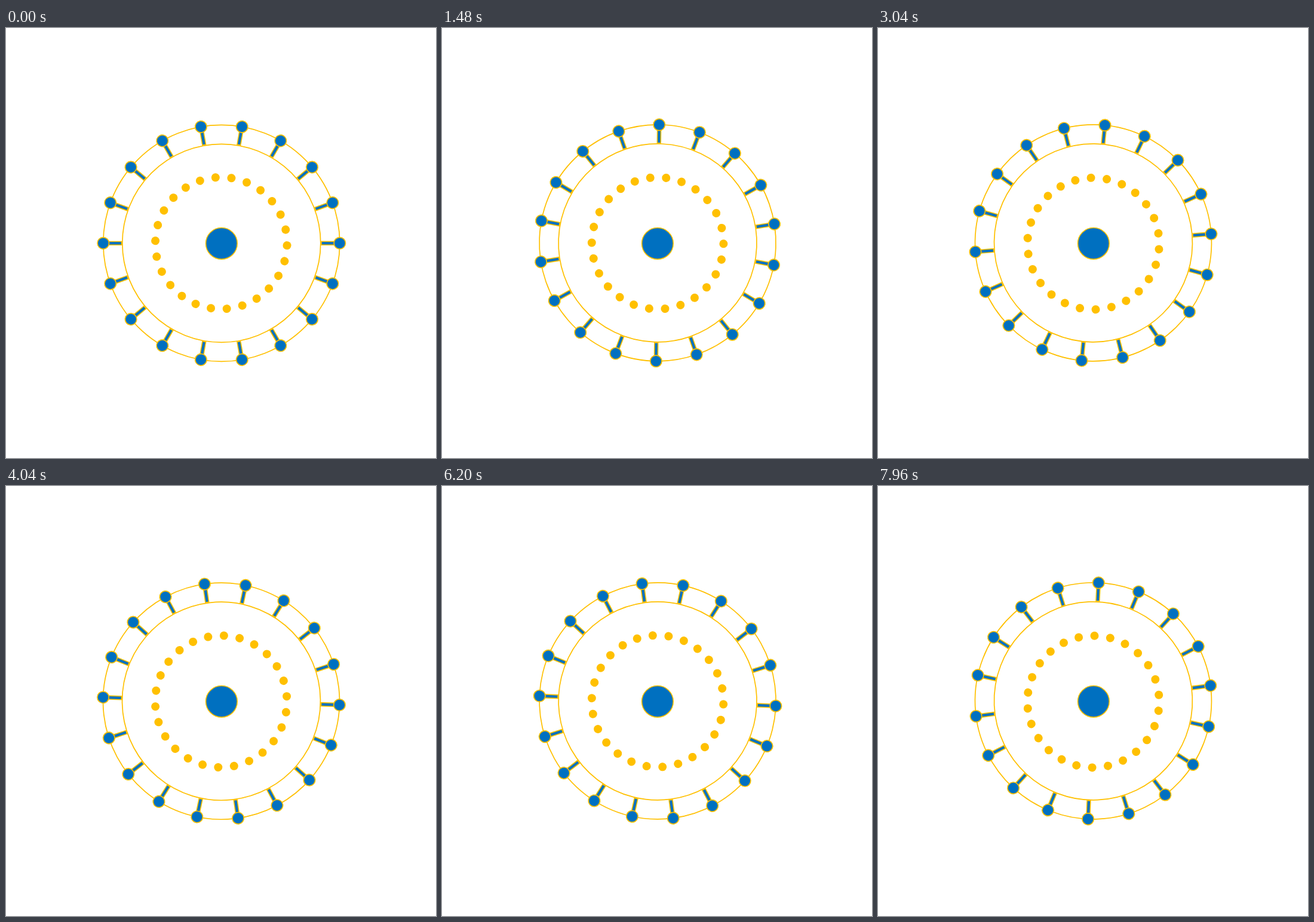
These frames come from a looping animation (720x720 px, 8 s). An HTML page with a canvas:

```html
<!DOCTYPE html>
<html lang="en">
<head>
<meta charset="utf-8">
<title>Counter-rotating rings</title>
<style>
  html, body { margin: 0; width: 100%; height: 100%; overflow: hidden; background: #fff; }
  canvas { display: block; }
</style>
</head>
<body>
<canvas id="stage" width="720" height="720"></canvas>
<script>
const ctx = document.getElementById('stage').getContext('2d');
const YELLOW = '#ffc000', BLUE = '#0070c0';
const LOOP = 8000, STEP = 40, DEG = Math.PI / 180;
const TURN = 2.952 * DEG; // rotation per step
const SPOKES = 18, BEADS = 26;

function circle(x, y, radius, fill, stroke, width) {
  ctx.beginPath();
  ctx.arc(x, y, radius, 0, Math.PI * 2);
  if (fill) { ctx.fillStyle = fill; ctx.fill(); }
  if (stroke) { ctx.strokeStyle = stroke; ctx.lineWidth = width; ctx.stroke(); }
}

function bar(from, to, thickness, fill) {
  ctx.fillStyle = fill;
  ctx.fillRect(from, -thickness / 2, to - from, thickness);
}

// Draws a ring of equal parts turning about a slightly off-centre pivot.
function ring(x, y, wobble, wobbleAngle, angle, count, drawPart, drawBase) {
  ctx.save();
  ctx.translate(x + wobble * Math.cos(angle + wobbleAngle),
                y + wobble * Math.sin(angle + wobbleAngle));
  ctx.rotate(angle);
  if (drawBase) drawBase();
  for (let i = 0; i < count; i++) {
    drawPart();
    ctx.rotate(Math.PI * 2 / count);
  }
  ctx.restore();
}

function wheelBase() {
  circle(0, 0, 198, null, YELLOW, 1.7);
  circle(0, 0, 166, null, YELLOW, 1.7);
}

function spoke() {
  bar(166.3, 198, 7.4, YELLOW);
  bar(168, 198, 4.2, BLUE);
  circle(198, 0, 9.7, BLUE, YELLOW, 1.7);
}

function bead() {
  circle(110.3, 0, 7, YELLOW);
}

function draw() {
  const turn = Math.floor(performance.now() % LOOP / STEP) * TURN;
  ctx.fillStyle = '#fff';
  ctx.fillRect(0, 0, 720, 720);
  ring(360.75, 360, 0.33, 80 * DEG, -turn, SPOKES, spoke, wheelBase);
  ring(360.6, 360.6, 0.5, -130 * DEG, turn, BEADS, () => {
    ctx.save();
    ctx.rotate(2.03 * DEG);
    bead();
    ctx.restore();
  });
  circle(360.9, 360.8, 26.3, BLUE, YELLOW, 1.6);
  requestAnimationFrame(draw);
}
draw();
</script>
</body>
</html>
```
